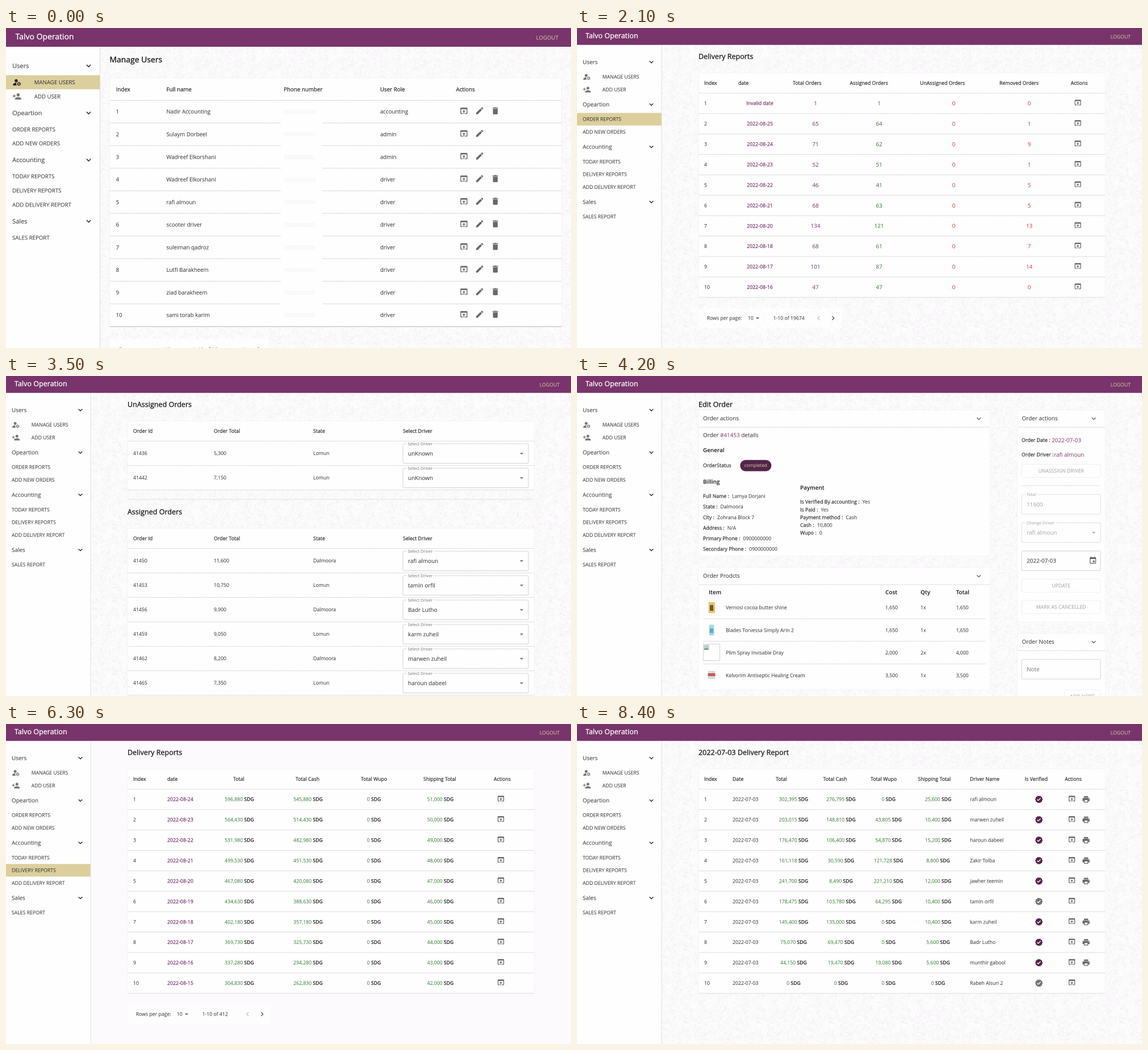
An HTML page with a canvas that plays this animation: 995 px wide and 563 px high, repeating every 9.1 s.

```html
<!DOCTYPE html>
<html lang="en">
<head>
<meta charset="utf-8">
<title>Operations dashboard</title>
<style>
html, body { margin: 0; width: 100%; height: 100%; overflow: hidden; background: #fcfafd; }
canvas { display: block; width: 995px; height: 563px; }
</style>
</head>
<body>
<canvas id="stage" width="1990" height="1126"></canvas>
<script>
// The canvas holds twice the stage resolution for smooth small text.
const W = 995, H = 563, DENSITY = 2, HOLD = 700, SIDE = 149.2;
const LEFT = 214, RIGHT = 930.5, ROW = 35.93;
const ctx = document.getElementById('stage').getContext('2d');
const C = {
  ink: '#2c2c2c', black: '#161616', grey: '#757575', pale: '#b4b4b4', line: '#dedede',
  purple: '#78346b', plum: '#53254a', tan: '#dccf9d', green: '#33792f',
  forest: '#2c5e2a', red: '#cf3b31', brick: '#b73630', page: '#fcfafd'
};
const SMALL = 8.7, BODY = 9.94, TITLE = 12.43, MEDIUM = 500;

// ---------- primitives ----------
// Medium is the regular face, slightly emboldened and spaced.
function setFont(size, weight) {
  ctx.font = `${weight === MEDIUM ? 400 : weight} ${size}px "Open Sans", sans-serif`;
  ctx.letterSpacing = (weight === MEDIUM ? size * 0.006 : 0) + 'px';
}
function textWidth(str, size, weight) {
  setFont(size, weight);
  return ctx.measureText(str).width;
}
function text(str, x, y, color = C.ink, size = SMALL, weight = 400, align = 'left') {
  setFont(size, weight);
  ctx.fillStyle = ctx.strokeStyle = color;
  ctx.textAlign = align;
  const baseline = y + size * 0.36;
  ctx.fillText(str, x, baseline);
  if (weight === MEDIUM) {
    ctx.lineWidth = size * 0.024;
    ctx.strokeText(str, x, baseline);
  }
  return ctx.measureText(str).width;
}
const heading = (str, y = 50) => text(str, LEFT, y, C.black, TITLE, MEDIUM);

function rect(x, y, w, h, fill) {
  ctx.fillStyle = fill;
  ctx.fillRect(x, y, w, h);
}
const rule = (y, x0 = LEFT, x1 = RIGHT, color = C.line) => rect(x0, y - 0.5, x1 - x0, 1, color);

function box(x, y, w, h, fill, stroke, radius = 2.5) {
  ctx.beginPath();
  ctx.roundRect(x, y, w, h, radius);
  if (fill) { ctx.fillStyle = fill; ctx.fill(); }
  if (stroke) { ctx.strokeStyle = stroke; ctx.lineWidth = 0.8; ctx.stroke(); }
}
const panel = (x, y, w, h) => box(x, y, w, h, 'rgba(255,255,255,.85)', '#f3f1f3');

const icons = {
  down: 'M16.6 8.6 12 13.2 7.4 8.6 6 10l6 6 6-6z',
  next: 'M10 6 8.6 7.4 13.2 12l-4.6 4.6L10 18l6-6z',
  prev: 'M15.4 7.4 14 6l-6 6 6 6 1.4-1.4-4.6-4.6z',
  drop: 'M7 10l5 5 5-5z',
  open: 'M19 4H5a2 2 0 0 0-2 2v12a2 2 0 0 0 2 2h4v-2H5V8h14v10h-4v2h4a2 2 0 0 0 2-2V6a2 2 0 0 0-2-2zm-7 6l-4 4h3v6h2v-6h3z',
  edit: 'M3 17.2V21h3.8L17.8 9.9l-3.7-3.7zM20.7 7a1 1 0 0 0 0-1.4l-2.3-2.3a1 1 0 0 0-1.4 0l-1.9 1.8 3.8 3.8z',
  bin: 'M6 19a2 2 0 0 0 2 2h8a2 2 0 0 0 2-2V7H6zM19 4h-3.5l-1-1h-5l-1 1H5v2h14z',
  print: 'M19 8H5a3 3 0 0 0-3 3v6h4v4h12v-4h4v-6a3 3 0 0 0-3-3zm-3 11H8v-5h8zm3-7a1 1 0 0 1 0-2a1 1 0 0 1 0 2zM18 3H6v4h12z',
  date: 'M17 12h-5v5h5zM16 1v2H8V1H6v2H5a2 2 0 0 0-2 2v14a2 2 0 0 0 2 2h14a2 2 0 0 0 2-2V5a2 2 0 0 0-2-2h-1V1zm3 18H5V8h14z',
  addUser: 'M15 12a4 4 0 1 0 0-8a4 4 0 0 0 0 8zM6 10V7H4v3H1v2h3v3h2v-3h3v-2zm9 4c-2.7 0-8 1.3-8 4v2h16v-2c0-2.7-5.3-4-8-4z',
  person: 'M10 12a4 4 0 1 0 0-8a4 4 0 0 0 0 8zM10.7 13C8 13 2 14.3 2 18v2h9.5c-1.6-2.3-1.9-4.7-.8-7z'
};
for (const key in icons) icons[key] = new Path2D(icons[key]);

function inIconSpace(x, y, draw) {
  ctx.save();
  ctx.translate(x, y);
  ctx.scale(0.622, 0.622);
  draw();
  ctx.restore();
}
function icon(name, x, y, color = '#686868') {
  inIconSpace(x, y, () => {
    ctx.translate(-12, -12);
    ctx.fillStyle = color;
    ctx.fill(icons[name], 'evenodd');
  });
}
function userGear(x, y, color) {
  icon('person', x, y, color);
  inIconSpace(x, y, () => {
    ctx.strokeStyle = color;
    ctx.beginPath();
    ctx.arc(5, 4, 2.9, 0, 7);
    ctx.lineWidth = 1.9;
    ctx.stroke();
    for (let i = 0; i < 6; i++) {
      const a = Math.PI * (i / 3 + 1 / 6), c = Math.cos(a), s = Math.sin(a);
      ctx.beginPath();
      ctx.moveTo(5 + 3 * c, 4 + 3 * s);
      ctx.lineTo(5 + 5 * c, 4 + 5 * s);
      ctx.stroke();
    }
  });
}
function badge(x, y, color) {
  inIconSpace(x, y, () => {
    ctx.beginPath();
    for (let i = 0; i < 20; i++) {
      const a = i * Math.PI / 10, r = i % 2 ? 9.2 : 11;
      ctx.lineTo(r * Math.cos(a), r * Math.sin(a));
    }
    ctx.fillStyle = color;
    ctx.fill();
    ctx.beginPath();
    ctx.moveTo(-5, 0.2);
    ctx.lineTo(-1.9, 3.3);
    ctx.lineTo(4.7, -3.3);
    ctx.strokeStyle = '#fff';
    ctx.lineWidth = 2.1;
    ctx.stroke();
  });
}

// ---------- shared pieces ----------
function makeTexture() {
  const tile = document.createElement('canvas');
  tile.width = tile.height = 128;
  const g = tile.getContext('2d');
  let seed = 41;
  const rnd = () => (seed = seed * 16807 % 2147483647) / 2147483647;
  g.fillStyle = '#fdfcfd';
  g.fillRect(0, 0, 128, 128);
  g.strokeStyle = '#f3f0f3';
  g.lineWidth = 0.9;
  for (let i = 0; i < 900; i++) {
    const x = rnd() * 128, y = rnd() * 128, a = Math.floor(rnd() * 8) * Math.PI / 4, r = 2 + rnd() * 4;
    g.beginPath();
    g.moveTo(x, y);
    g.lineTo(x + r * Math.cos(a), y + r * Math.sin(a));
    g.stroke();
  }
  return ctx.createPattern(tile, 'repeat');
}
const texture = makeTexture();

const menu = [
  ['Users', 'MANAGE USERS', 'ADD USER'],
  ['Opeartion', 'ORDER REPORTS', 'ADD NEW ORDERS'],
  ['Accounting', 'TODAY REPORTS', 'DELIVERY REPORTS', 'ADD DELIVERY REPORT'],
  ['Sales', 'SALES REPORT']
];
function chrome(active, width, height) {
  rect(0, 0, SIDE, height, '#fefefe');
  rect(SIDE - 0.6, 0, 0.9, height, '#dddcde');
  rect(0, 0, width, 29.7, C.purple);
  text('Talvo Operation', 15, 13.7, '#fff', TITLE, MEDIUM);
  text('LOGOUT', width - 20, 15.3, C.tan, SMALL, 400, 'right');
  const itemStep = 22.36, sectionStep = 26.1;
  let y = 59.9;
  for (const [section, ...items] of menu) {
    text(section, 10, y, C.ink, BODY);
    icon('down', 131, y, C.black);
    y += sectionStep;
    for (const item of items) {
      const on = item === active, tint = on ? '#222' : C.grey;
      if (on) rect(0, y - 11.2, SIDE - 0.6, 22.2, C.tan);
      if (item === 'MANAGE USERS') userGear(17.4, y, tint);
      if (item === 'ADD USER') icon('addUser', 17.4, y, tint);
      text(item, section === 'Users' ? 44.8 : 10, y);
      y += itemStep;
    }
    y += sectionStep - itemStep;
  }
}

// Draws the header and separators, calls drawRow at each row centre, returns the bottom edge.
function table(headY, heads, rows, drawRow, pitch = ROW) {
  const first = headY + 17.6, bottom = first + rows.length * pitch;
  panel(LEFT, headY - 18, RIGHT - LEFT, bottom - headY + 18);
  heads.forEach(([label, x]) => text(label, x, headY, C.ink, SMALL, MEDIUM));
  rule(first);
  rows.forEach((row, i) => {
    rule(first + (i + 1) * pitch);
    drawRow(row, first + (i + 0.5) * pitch, i);
  });
  return bottom;
}
function pagination(range, tableBottom) {
  const y = tableBottom + 36.6;
  rect(LEFT, y - 17, 252, 34, 'rgba(255,255,255,.7)');
  text('Rows per page:', 228.8, y);
  text('10', 300.8, y);
  icon('drop', 318, y);
  text(range, 345.5, y);
  icon('prev', 425.5, y, '#bbb');
  icon('next', 451, y, '#444');
}
function money(amount, x, y, centered = true, weight = 400) {
  const num = (typeof amount === 'number' ? amount.toLocaleString('en-US') : amount) + ' ';
  const numWidth = textWidth(num, SMALL, weight);
  const start = centered ? x - (numWidth + textWidth('SDG', SMALL, 600)) / 2 : x;
  text(num, start, y, C.green, SMALL, weight);
  text('SDG', start + numWidth, y, C.black, SMALL, 600);
}
function card(x, y, w, value, label, fill, valueColor = C.ink) {
  const dark = fill !== C.tan;
  panel(x, y - 14, w, 53);
  text(value, x + w / 2, y, valueColor, BODY, 400, 'center');
  box(x, y + 18.5, w, 20.5, fill, null, 1.5);
  rect(x + 1, y + 38.6, w - 2, 0.8, 'rgba(0,0,0,.22)');
  text(label, x + 10, y + 30.4, dark ? '#fff' : C.black, SMALL, MEDIUM);
}
function field(label, x, y, w, value, { color = C.ink, border = '#c9c9c9', arrow } = {}) {
  box(x, y, w, 34.6, null, border);
  if (label) {
    const size = 7.46;
    rect(x + 6, y - 1, textWidth(label, size, 400) + 5, 2, '#fefefe');
    text(label, x + 8.6, y, color === C.ink ? C.grey : '#a5a5a5', size);
  }
  text(value, x + 9, y + 17.3, color, BODY);
  if (arrow) icon('drop', x + w - 12, y + 17.3, arrow);
}
function button(label, x, y, w) {
  box(x, y, w, 23, null, '#ececec');
  text(label, x + w / 2, y + 11.5, C.pale, SMALL, MEDIUM, 'center');
}
const day = (month, d) => new Date(Date.UTC(2022, month - 1, d)).toISOString().slice(0, 10);
const selectRow = ([id, total, state, driver], y) => {
  text(id, 224, y);
  text(total, 366, y);
  text(state, 541, y);
  field('Select Driver', 699, y - 17, 221, driver, { arrow: C.grey });
};

// ---------- screens ----------
const people = [
  ['Nadir Accounting', 'accounting'], ['Sulaym Dorbeel', 'admin'], ['Wadreef Elkorshani', 'admin'],
  ['Wadreef Elkorshani', 'driver'], ['rafi almoun', 'driver'], ['scooter driver', 'driver'],
  ['suleiman qadroz', 'driver'], ['Lutfi Barakheem', 'driver'], ['ziad barakheem', 'driver'],
  ['sami torab karim', 'driver']
];
function manageUsers() {
  const pitch = 35.8;
  heading('Manage Users');
  const bottom = table(97, [['Index', 224], ['Full name', 304], ['Phone number', 490], ['User Role', 642.8], ['Actions', 763]],
    people, ([name, role], y, i) => {
      text(i + 1, 224, y);
      text(name, 304, y);
      text(role, 642.8, y);
      icon('open', 775.5, y - 1.4);
      icon('edit', 800.5, y - 1.4);
      if (role !== 'admin') icon('bin', 825.3, y - 1.4);
    }, pitch);
  rect(LEFT, bottom - 0.2, RIGHT - LEFT, 1, '#c4c4c4');
  rect(485.3, 118, 65.5, 353, '#fefefe');
  people.forEach((_, i) => text('090000000' + i, 490, 132.7 + i * pitch, '#efefef'));
  pagination('1-10 of 19', bottom);
}

function addUser() {
  heading('Add User');
  panel(LEFT, 79, RIGHT - LEFT, 190);
  ['Full name', 'Phone number', 'Password', 'User Role'].forEach((label, i) =>
    field('', 224 + i % 2 * 353, 95 + Math.floor(i / 2) * 52, 343, label,
      { color: C.grey, arrow: i === 3 && C.grey }));
  box(224, 212, 90, 24, C.purple);
  text('ADD USER', 269, 224, '#fff', SMALL, MEDIUM, 'center');
}

function orderReports() {
  const days = [0, 25, 24, 23, 22, 21, 20, 18, 17, 16];
  const totals = [1, 65, 71, 52, 46, 68, 134, 68, 101, 47];
  const removed = [0, 1, 9, 1, 5, 5, 13, 7, 14, 0];
  heading('Delivery Reports');
  const bottom = table(97, [['Index', 224], ['date', 284], ['Total Orders', 380], ['Assigned Orders', 480.5],
    ['UnAssigned Orders', 604], ['Removed Orders', 744], ['Actions', 869.5]], days, (d, y, i) => {
    const count = (n, x, color) => text(n, x, y, color, BODY, 400, 'center');
    text(i + 1, 224, y);
    text(d ? day(8, d) : 'Invalid date', 322, y, C.purple, SMALL, MEDIUM, 'center');
    count(totals[i], 420, C.purple);
    count(totals[i] - removed[i], 532, C.green);
    count(0, 663.5, C.red);
    count(removed[i], 796.5, C.red);
    icon('open', 882, y - 1.4);
  });
  pagination('1-10 of 19674', bottom);
}

const drivers = ['rafi almoun', 'tamin orfil', 'Badr Lutho', 'karm zuheil', 'marwen zuheil',
  'haroun dabeel', 'Zakir Tolba', 'jawher teemin', 'Rabeh Alsuri 2', 'munthir gabool'];
const orderHeads = [['Order Id', 224], ['Order Total', 366], ['State', 541], ['Select Driver', 699]];
const openOrders = [['41436', '5,300', 'Lomun', 'unKnown'], ['41442', '7,150', 'Lomun', 'unKnown']];

function report() {
  const column = i => LEFT + i % 4 * 181.5, line = i => Math.floor(i / 4) * 62.1;
  heading('Report');
  [['2022-07-03', 'Date', C.plum], ['151', 'Total Orders', C.plum], ['135', 'Assigned Orders', C.forest],
    ['2', 'UnAssigned Orders', C.brick], ['14', 'Removed Orders', C.brick]]
    .forEach(([value, label, fill], i) => card(column(i), 83.7 + line(i), 172, value, label, fill));
  rule(194.5);
  heading('Drivers', 215);
  const counts = [32, 16, 7, 13, 13, 19, 11, 15, 2, 7];
  drivers.forEach((name, i) =>
    card(column(i), 248.4 + line(i), 172, counts[i] + ' orders', 'Driver : ' + name, C.tan));
  rule(421, LEFT, RIGHT, '#e2d6dc');
  heading('UnAssigned Orders', 441.5);
  table(489, orderHeads, openOrders, selectRow, 43);
}

function reportScrolled() {
  heading('UnAssigned Orders', 50);
  table(97, orderHeads, openOrders, selectRow, 43);
  rule(217);
  heading('Assigned Orders', 239);
  const rows = Array.from({ length: 7 }, (_, i) =>
    [String(41450 + i * 3), (11600 - i * 850).toLocaleString('en-US'), i % 2 ? 'Lomun' : 'Dalmoora', drivers[i]]);
  table(286, orderHeads, rows, selectRow, 43);
}

function editOrder() {
  const bold = (str, x, y) => text(str, x, y, C.black, BODY, 600);
  const pair = (label, value, x, y) => text(value, x + text(label + ' :', x, y, C.ink, SMALL, MEDIUM) + 5, y);
  const panelHead = (title, x, y, w, h) => {
    panel(x, y, w, h);
    text(title, x + 8, y + 14.5, C.ink, BODY);
    icon('down', x + w - 20.5, y + 15, '#555');
    rule(y + 30, x, x + w);
  };
  heading('Edit Order');

  panelHead('Order actions', LEFT, 60, 514, 257);
  let x = 222 + text('Order ', 222, 104, C.ink, BODY);
  x += text('#41453', x, 104, C.purple, BODY);
  text(' details', x, 104, C.ink, BODY);
  bold('General', 222, 130.5);
  text('OrderStatus', 222, 157.5, C.ink, SMALL, MEDIUM);
  box(287.3, 147.7, 55, 19.8, C.plum, null, 9.9);
  text('completed', 314.8, 157.3, C.tan, 8.1, 400, 'center');
  bold('Billing', 222, 186);
  [['Full Name', 'Lamya Dorjani'], ['State', 'Dalmoora'], ['City', 'Zohrana Block 7'], ['Address', 'N/A'],
    ['Primary Phone', '0900000000'], ['Secondary Phone', '0900000000']]
    .forEach(([label, value], i) => pair(label, value, 222, 211.5 + i * 18.6));
  bold('Payment', 393, 196.3);
  [['Is Verified By accounting', 'Yes'], ['Is Paid', 'Yes'], ['Payment method', 'Cash'], ['Cash', '10,800'], ['Wupo', '0']]
    .forEach(([label, value], i) => pair(label, value, 393, 221.5 + i * 13.65));

  panelHead('Order Prodcts', LEFT, 337, 514, 215);
  const columns = [262, 543, 605, 667.5];
  ['Item', 'Cost', 'Qty', 'Total'].forEach((label, i) => bold(label, i ? columns[i] : 232, 380.5));
  [['Vernosi cocoa butter shine', '1,650', '1x', '1,650'], ['Blades Torvessa Simply Arin 2', '1,650', '1x', '1,650'],
    ['Plim Spray Invisable Dray', '2,000', '2x', '4,000'], ['Kelvorim Antiseptic Healing Cream', '3,500', '1x', '3,500']]
    .forEach((cells, i) => {
      const y = 407.4 + i * 39.8;
      cells.forEach((cell, j) => text(cell, columns[j], y));
      if (i < 3) rule(y + 19.6, 222, 720);
    });
  box(231.5, 398, 11.5, 19, '#e5c668', null, 1);
  rect(234, 403, 6, 10, '#75513a');
  box(232.5, 437.5, 9, 19, '#a9d9e4', null, 2);
  rect(234, 444, 6, 8, '#5eabc2');
  box(222.4, 471.8, 29, 29, '#fff', '#c8c8c8', 0);
  rect(223.5, 473, 9, 9, '#b9cbe4');
  rect(224, 479, 7, 3, '#7da66f');
  box(230.5, 519, 13, 14, '#d8d8d8', null, 1.5);
  rect(230.5, 523, 13, 5, '#c95852');

  const side = 775.5, inner = 783, width = 139, muted = { color: '#a3a3a3', border: '#d9d9d9' };
  panelHead('Order actions', side, 60, 155, 373);
  text('Order Date :', inner, 113, C.ink, SMALL, MEDIUM);
  text('2022-07-03', 836, 113, C.purple, BODY);
  text('Order Driver :', inner, 138.5, C.ink, SMALL, MEDIUM);
  text('rafi almoun', 840, 138.5, C.purple, BODY);
  button('UNASSSIGN DRIVER', inner, 155.5, width);
  rule(193, inner, inner + width);
  field('Total', inner, 208.5, width, '11600', muted);
  field('Change Driver', inner, 258.2, width, 'rafi almoun', { ...muted, arrow: '#aaa' });
  field('', inner, 307.8, width, '2022-07-03');
  icon('date', 908.5, 324.5, '#666');
  button('UPDATE', inner, 357.5, width);
  button('MARK AS CANCELLED', inner, 395, width);
  panelHead('Order Notes', side, 453, 155, 130);
  field('', inner, 498.5, width, 'Note', { color: C.grey });
  button('ADD NOTE', 858, 552.5, 64);
}

function addOrders() {
  heading('Add New Orders');
  field('', LEFT, 79, 343, 'Order Id', { color: C.grey });
  box(LEFT, 128, 90, 24, C.purple);
  text('ADD ORDERS', LEFT + 45, 140, '#fff', SMALL, MEDIUM, 'center');
}

function todayReport() {
  heading('2022-08-24 Delivery Report');
  table(97, [['Index', 224], ['Date', 273.5], ['Total', 349], ['Total Cash', 432.5], ['Total Wupo', 515.5],
    ['Shipping Total', 592], ['Driver Name', 683.5], ['Is Verified', 811.5], ['Actions', 882]], [1], (n, y) => {
    text(n, 224, y);
    text('2022-08-24', 273.5, y);
    money(745055, 381, y);
    money(695055, 464, y);
    money(0, 544, y);
    money(50000, 628, y);
    text('ronex delivery account', 683.5, y);
    badge(837, y, '#707070');
    icon('open', 894.3, y - 1.4);
  });
}

function deliveryList(month, lastDay, range) {
  heading('Delivery Reports');
  const bottom = table(97, [['Index', 224], ['date', 284], ['Total', 400], ['Total Cash', 510], ['Total Wupo', 625],
    ['Shipping Total', 735], ['Actions', 859]], Array.from({ length: 10 }), (_, y, i) => {
    const cash = 545880 - i * 31450, shipping = 51000 - i * 1000;
    text(i + 1, 224, y);
    text(day(month, lastDay - i), 284, y, C.purple, SMALL, MEDIUM);
    money(cash + shipping, 411, y);
    money(cash, 532, y);
    money(0, 648, y);
    money(shipping, 765, y);
    icon('open', 871.5, y - 1.4);
  });
  pagination(range, bottom);
}

function deliveryDetail() {
  heading('Delivery Report 2022-08-23', 52.3);
  badge(390.5, 52.3, C.purple);
  icon('print', 420.5, 52.3);
  [['596,880 SDG', 'Total'], ['545,880 SDG', 'Total Cash'], ['0 SDG', 'Total Wupo'],
    ['51', 'Total Orders'], ['51', 'Completed Orders'], ['0', 'Incompleted Orders']].forEach(([value, label], i) => {
    const top = i < 3, col = i % 3;
    card(LEFT + col * 248.7, top ? 98.6 : 160.7, col < 2 ? 238.7 : 219, value, label,
      top ? C.forest : C.purple, top ? C.green : C.ink);
  });
  text('Completed Orders', LEFT, 227, C.ink, BODY);
  table(271.3, [['Order Id', 224], ['Payment Method', 297.5], ['Total', 421], ['Shipping Total', 518.5],
    ['Total Cash', 625], ['Total Wupo', 723], ['actions', 812.5]],
    [[44296, 2710], [46441, 17250], [46479, 6500], [46565, 14650], [46567, 8950], [46600, 3650], [46603, 7650], [46604, 9290]],
    ([id, total], y) => {
      text(id, 224, y, C.black, BODY, 600);
      text('Cash', 297.5, y);
      [[total, 421], [1000, 518.5], [total - 1000, 625], [0, 723]]
        .forEach(([n, x]) => money(String(n), x, y, false, 600));
      ['open', 'edit', 'bin'].forEach((name, i) => icon(name, 825 + i * 24.7, y - 1.4));
    });
}

function dayReport() {
  // driver index, cash, wallet, shipping
  const rows = [[0, 276795, 0, 25600], [4, 148810, 43805, 10400], [5, 106400, 54870, 15200], [6, 30590, 121728, 8800],
    [7, 8490, 221210, 12000], [1, 103780, 64295, 10400], [3, 135000, 0, 10400], [2, 69470, 0, 5600],
    [9, 19470, 19080, 5600], [8, 0, 0, 0]];
  const centres = [381.5, 465, 548.7, 636];
  heading('2022-07-03 Delivery Report');
  table(97, [['Index', 224], ['Date', 274], ['Total', 350], ['Total Cash', 433.5], ['Total Wupo', 517],
    ['Shipping Total', 600.5], ['Driver Name', 692], ['Is Verified', 788.5], ['Actions', 859]],
    rows, ([driver, cash, wallet, shipping], y, i) => {
      const verified = i !== 5 && i !== 9;
      text(i + 1, 224, y);
      text('2022-07-03', 274, y);
      [cash + wallet + shipping, cash, wallet, shipping].forEach((n, j) => money(n, centres[j], y));
      text(drivers[driver], 692, y);
      badge(813.5, y, verified ? C.plum : '#757575');
      icon('open', 871.5, y - 1.4);
      if (verified) icon('print', 896.5, y);
    });
}

// ---------- timeline ----------
const scenes = [
  { draw: manageUsers, active: 'MANAGE USERS', zoom: 1.1111 },
  { draw: manageUsers, active: 'MANAGE USERS' },
  { draw: addUser, active: 'ADD USER' },
  { draw: orderReports, active: 'ORDER REPORTS' },
  { draw: report },
  { draw: reportScrolled },
  { draw: editOrder },
  { draw: addOrders, active: 'ADD NEW ORDERS', plain: true },
  { draw: todayReport, active: 'TODAY REPORTS', plain: true },
  { draw: () => deliveryList(8, 24, '1-10 of 412'), active: 'DELIVERY REPORTS', plain: true },
  { draw: deliveryDetail },
  { draw: () => deliveryList(7, 8, '41-50 of 412'), active: 'DELIVERY REPORTS' },
  { draw: dayReport }
];

function render({ draw, active, zoom = 1, plain }) {
  const width = W / zoom;
  ctx.setTransform(DENSITY, 0, 0, DENSITY, 0, 0);
  rect(0, 0, W, H, plain ? C.page : texture);
  ctx.scale(zoom, zoom);
  ctx.save();
  ctx.translate((width - W) / 2, 0);
  draw();
  ctx.restore();
  chrome(active, width, H / zoom);
}

let shown = -1;
function tick() {
  const index = Math.floor(performance.now() / HOLD) % scenes.length;
  if (index !== shown) render(scenes[shown = index]);
  requestAnimationFrame(tick);
}
tick();
</script>
</body>
</html>
```
